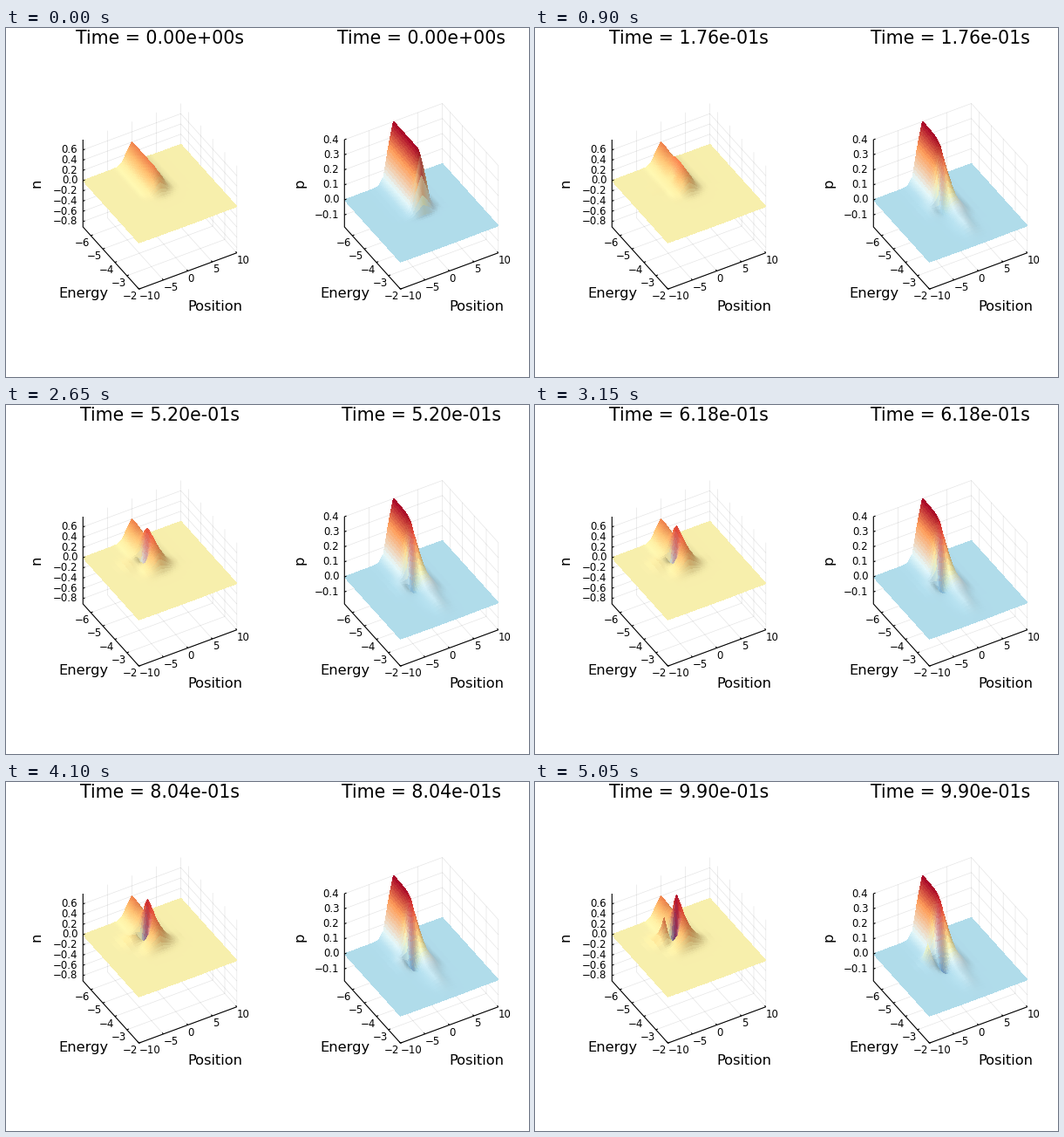
Animation of 600 by 400 pixels, one loop 5100 ms. Source, as a matplotlib script:

```python
import numpy as np
import matplotlib.pyplot as plt
from matplotlib.animation import FuncAnimation
from matplotlib.collections import LineCollection, PolyCollection

FRAMES, STEP = 102, 50
plt.rcParams["font.family"] = "DejaVu Sans"

fig = plt.figure(figsize=(6, 4), dpi=100, facecolor="white")
ax = fig.add_axes([0, 0, 1, 1])
ax.set(xlim=(0, 600), ylim=(400, 0))
ax.axis("off")

# Box edges on screen: origin, position, energy and height directions
ORIGIN = np.array([88.3, 228.0])
POS = np.array([112.3, -41.5])
ENE = np.array([64.2, 71.2])
UP = np.array([0.0, -100.0])
E_MIN, E_MAX = -6.65, -2.0

# Coarse mesh, and its bilinear refinement around the ridge
X = np.arange(-8.0, 7)
S = np.linspace(0, 1, 26)
XF = np.concatenate([np.arange(-8, -4), np.linspace(-4, 4, 65), [5, 6]])
SF = np.concatenate([np.linspace(0, 0.68, 35), np.linspace(0.72, 1, 8)])
XX, SS = np.meshgrid(X, S)
XXF, SSF = np.meshgrid(XF, SF)


def hat(fine, coarse):
    return np.array([np.interp(fine, coarse, row) for row in np.eye(len(coarse))]).T


WX, WS = hat(XF, X), hat(SF, S)
LIGHT = np.array([-0.8, -0.48, 0.36])
CMAP = plt.get_cmap("RdYlBu_r")


def refine(a):
    return WS @ a @ WX.T


def ramp(t, a, b):
    return np.clip((t - a) / (b - a), 0, 1)


def bell(x0, s0, wx, ws, ws_right=None):
    w = np.where(SS > s0, ws_right or ws, ws)
    return np.exp(-((XX - x0) / wx) ** 2 - ((SS - s0) / w) ** 2)


def ridge(edge, width):
    step = 1 / (1 + np.exp(np.clip((SS - edge) / width, -50, 50)))
    return np.exp(-XX**2 / 2) / np.sqrt(2 * np.pi) * step


def electrons(t):
    u = ramp(t, 0.13, 0.99)
    start = ramp(t, 0, 0.18)
    z = ridge(0.5, 0.02)
    z += 0.42 * u * bell(0, 0.28, 0.9, 0.05, 0.12)
    z -= (0.05 * start + 0.06 * u) * bell(0, 0.18, 1.3, 0.05)
    z -= (0.05 * start + 1.2 * u**0.85) * bell(-1, 0.31, 0.6, 0.06)
    z += 0.42 * ramp(t, 0.68, 0.99) ** 1.6 * bell(-3, 0.32, 0.7, 0.045)
    z += 0.10 * u * bell(-4, 0.30, 1.0, 0.08)
    z += 0.07 * u * bell(-2, 0.50, 1.2, 0.06)
    z += 0.10 * u * bell(2, 0.44, 1.0, 0.07)
    return z


def holes(t):
    q = 1 - np.exp(-t / 0.05)
    u = ramp(t, 0.1, 0.99)
    late = ramp(t, 0.75, 0.99)
    # The near side of the ridge retreats further than the far side
    near = XX < 0
    z = ridge(0.51 - np.where(near, 0.14 * q + 0.07 * u, 0.08 * q),
              0.012 + np.where(near, 0.008, 0.038) * q)
    z -= (0.02 * q + 0.09 * u) * bell(-1, 0.42 + 0.04 * late, 0.6, 0.07)
    z += 0.05 * q * bell(1.5, 0.50, 1.0, 0.10)
    z += q * (0.035 - 0.015 * u) * bell(0.4, 0.70, 1.1, 0.14)
    z += 0.018 * q * bell(-2.8, 0.38, 0.8, 0.10)
    z += 0.11 * late**1.5 * bell(-3, 0.36, 0.6, 0.05)
    return z


class Panel:
    def __init__(self, dx, name, name_x, field, lo, hi, ticks, flat):
        self.origin = ORIGIN + [dx, 0]
        self.lo, self.hi, self.field, self.flat = lo, hi, field, flat
        self.frame(ticks)
        self.plane()
        self.mesh = PolyCollection([], linewidths=0, edgecolors="none",
                                   antialiaseds=False, zorder=3)
        ax.add_collection(self.mesh)
        self.title = ax.text(176.5 + dx, 18, "", fontsize=14.8, ha="center",
                             va="baseline")
        for x, y, s, rot in ((name_x, 177.5, name, 90), (89 + dx, 304, "Energy", 0),
                             (239.5 + dx, 320, "Position", 0)):
            ax.text(x, y, s, fontsize=11.7, rotation=rot, ha="center", va="center")

    def at(self, x, s, h):
        """Screen point for box fractions x, s, h."""
        x, s, h = (np.asarray(v, float)[..., None] for v in (x, s, h))
        return self.origin + x * POS + s * ENE + h * UP

    def frac(self, z):
        return (z - self.lo) / (self.hi - self.lo)

    def frame(self, ticks):
        grid, black = [], []

        def path(dest, *pts):
            dest.append([self.at(*p) for p in pts])

        def label(p, dx, dy, s, ha):
            ax.text(p[0] + dx, p[1] + dy, s, fontsize=8.5, ha=ha, va="center")

        def text(v, digits=0):
            return f"{v:.{digits}f}".replace("-", "\u2212")

        for v in range(-10, 11, 5):
            f = (v + 10) / 20
            path(grid, (f, 1, 0), (f, 0, 0), (f, 0, 1))
            path(black, (f, 1, 0), (f, 0.98, 0))
            label(self.at(f, 1, 0), 0, 8.7, text(v), "left")
        for v in range(-6, -1):
            f = (v - E_MIN) / (E_MAX - E_MIN)
            path(grid, (0, f, 0), (1, f, 0), (1, f, 1))
            path(black, (0, f, 0), (0.02, f, 0))
            label(self.at(0, f, 0), -1, 8.5, text(v), "right")
        for v in ticks:
            f = self.frac(v)
            path(grid, (0, 0, f), (1, 0, f), (1, 1, f))
            path(black, (0, 0, f), (0.02, 0, f))
            label(self.at(0, 0, f), -6, 0, text(v, 1), "right")
        path(black, (0, 0, 1), (0, 0, 0), (0, 1, 0), (1, 1, 0))
        ax.add_collection(LineCollection(grid, colors=(0, 0, 0, 0.1),
                                         linewidths=0.5, zorder=1))
        ax.add_collection(LineCollection(black, colors="black",
                                         linewidths=0.8, zorder=4))

    def plane(self):
        h = self.frac(0)
        color = np.array(CMAP(h)[:3]) * self.flat
        corners = [self.at(x, s, h) for x, s in ((0, 0), (1, 0), (1, 1), (0, 1))]
        ax.add_collection(PolyCollection([corners], facecolors=[color],
                                         edgecolors="none", antialiaseds=False,
                                         zorder=2))

    def colors(self, z):
        gs, gx = np.gradient(0.7 * self.frac(z), S[1] - S[0], (X[1] - X[0]) / 20)
        normal = np.stack([-gx, -gs, np.ones_like(z)], -1)
        normal /= np.linalg.norm(normal, axis=-1, keepdims=True)
        shade = np.clip(self.flat + 0.28 * (normal @ LIGHT - LIGHT[2]), 0.6, 1.02)
        rgb = CMAP(self.frac(z))[..., :3] * shade[..., None]
        return np.clip(rgb, 0, 1)

    def draw(self, t):
        z = self.field(t)
        pts = self.at((XXF + 10) / 20, SSF, self.frac(refine(z)))
        rgb = np.stack([refine(c) for c in np.moveaxis(self.colors(z), -1, 0)], -1)
        # Far cells first: low energy, high position
        pts, rgb = pts[:, ::-1], rgb[:, ::-1]
        quads = np.stack([pts[:-1, :-1], pts[:-1, 1:], pts[1:, 1:], pts[1:, :-1]], 2)
        face = (rgb[:-1, :-1] + rgb[:-1, 1:] + rgb[1:, 1:] + rgb[1:, :-1]) / 4
        quads, face = quads.reshape(-1, 4, 2), face.reshape(-1, 3)
        # Drop cells turned away from the viewer
        a, b = quads[:, 2] - quads[:, 0], quads[:, 3] - quads[:, 1]
        seen = a[:, 0] * b[:, 1] - a[:, 1] * b[:, 0] < 0
        quads, face = quads[seen], face[seen]
        # Grow each cell a little to close the seams
        out = quads - quads.mean(1, keepdims=True)
        quads = quads + 0.4 * out / (np.linalg.norm(out, axis=-1, keepdims=True) + 1e-6)
        self.mesh.set_verts(quads)
        self.mesh.set_facecolor(face)
        self.title.set_text(f"Time = {t:.2e}s")


panels = [
    Panel(0, "n", 35, electrons, -0.905, 0.8, np.arange(-4, 4) * 0.2, 0.97),
    Panel(300, "p", 337, holes, -0.18, 0.4, np.arange(-1, 5) * 0.1, 1.0),
]


def update(k):
    for panel in panels:
        panel.draw(k / FRAMES)
    return []


anim = FuncAnimation(fig, update, frames=FRAMES, interval=STEP, repeat=True,
                     repeat_delay=0, blit=False)
plt.show()
```
